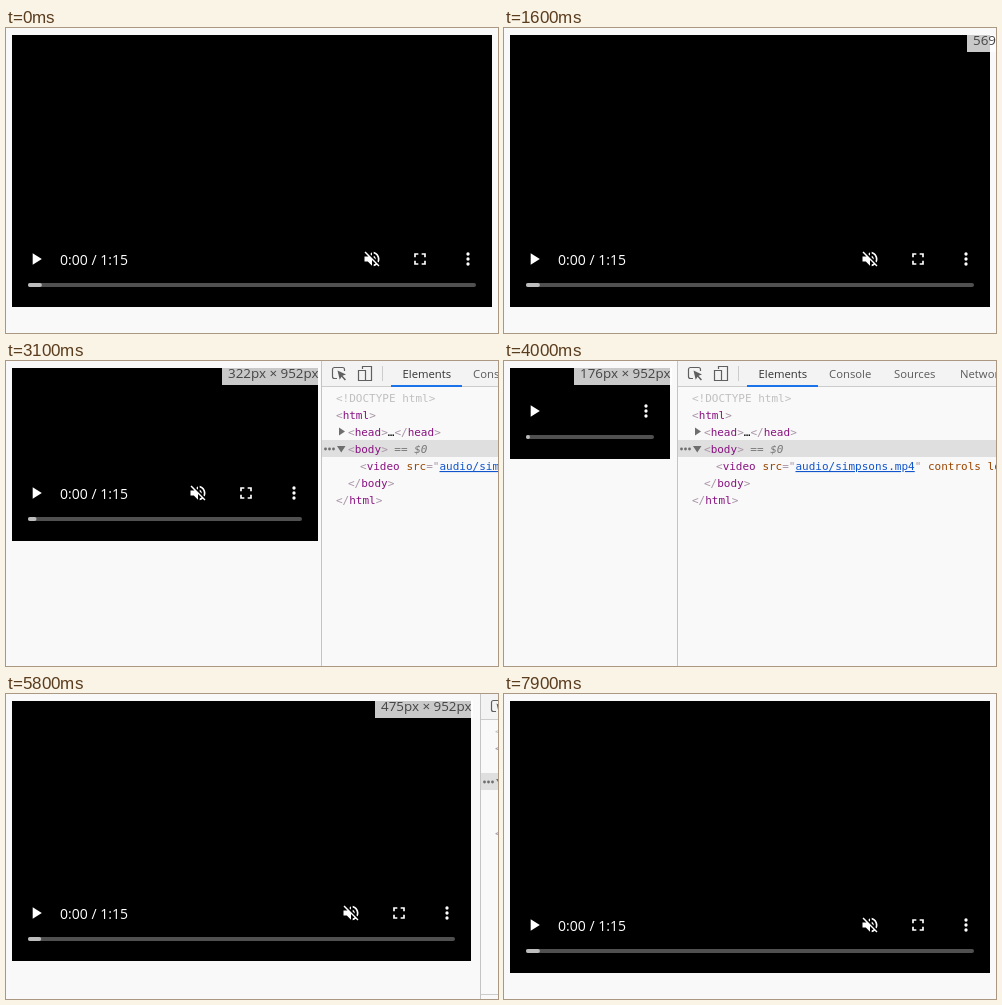
Animation of 492 by 305 pixels, one loop 8300 ms. Source, as an HTML page:

```html
<!DOCTYPE html>
<html lang="en">
<head>
<meta charset="utf-8">
<title>Resizing a video player</title>
<style>
  html, body { margin: 0; width: 100%; height: 100%; overflow: hidden; background: #f9f9f9; }
  svg { display: block; width: 100%; height: 100%; }
  text { white-space: pre; }
  .ui { font-family: "Open Sans", "Noto Sans", sans-serif; }
  .code { font: 11px "DejaVu Sans Mono", "Noto Sans Mono", monospace; }
  .tab { font-size: 11.3px; fill: #5a5a5a; }
  .p { fill: #a894a6; }
  .t { fill: #881280; }
  .a { fill: #994500; }
  .v { fill: #1a1aa6; }
  .link { fill: #1155cc; text-decoration: underline; }
  .dim { fill: #777; font-style: italic; }
  .doc { fill: #c0c0c0; }
</style>
</head>
<body>
<svg viewBox="0 0 492 305">
  <rect width="492" height="305" fill="#f9f9f9"/>

  <rect id="video" x="6" y="7"/>
  <g id="controls" fill="#fff">
    <path id="play" d="M8 5v14l11-7z"/>
    <text id="time" class="ui" x="54" y="5.5" font-size="14"><tspan>0:00</tspan><tspan id="duration"> / 1:15</tspan></text>
    <path id="mute" d="M16.5 12c0-1.77-1.02-3.29-2.5-4.03v2.21l2.45 2.45c.03-.2.05-.41.05-.63zm2.5 0c0 .94-.2 1.82-.54 2.64l1.51 1.51C20.63 14.91 21 13.5 21 12c0-4.28-2.99-7.86-7-8.77v2.06c2.89.86 5 3.54 5 6.71zM4.27 3L3 4.27 7.73 9H3v6h4l5 5v-6.73l4.25 4.25c-.67.52-1.42.93-2.25 1.18v2.06c1.38-.31 2.63-.95 3.69-1.81L19.73 21 21 19.73l-9-9L4.27 3zM12 4L9.91 6.09 12 8.18V4z"/>
    <path id="full" d="M5 10V5h5v2H7v3zM14 5h5v5h-2V7h-3zM5 14h2v3h3v2H5zM17 14h2v5h-5v-2h3z"/>
    <g id="menu"><circle cx="12" cy="6" r="2"/><circle cx="12" cy="12" r="2"/><circle cx="12" cy="18" r="2"/></g>
    <rect id="track" x="22" y="24" height="4" rx="2" fill="#505050"/>
    <rect id="buffer" x="22" y="24" height="4" rx="2" fill="#bdbdbd"/>
  </g>

  <g id="label">
    <rect y="7" width="98" height="17" fill="#fff" fill-opacity=".79"/>
    <text id="size" class="ui" x="6" y="17" font-size="13.4" fill="#444"></text>
  </g>

  <g id="panel">
    <rect width="500" height="305" fill="#f9f9f9"/>
    <rect width="500" height="25" fill="#f3f3f3"/>
    <rect y="25" width="500" height="1" fill="#ccc"/>
    <g fill="none" stroke="#5f5f5f" stroke-width="1.2">
      <path d="M16 17.5H13.5a2 2 0 0 1-2-2V8.5a2 2 0 0 1 2-2H21.500a2 2 0 0 1 2 2V10"/>
      <path d="M41.500 8V5.500H50.500V19.500H45M37.500 9.500H44.500V19.500H37.500Z"/>
    </g>
    <path d="M16.500 9.500L25 13.500L21.500 14.700L25 18.500L23.800 19.500L20.500 15.800L18.700 18.700Z" fill="#5f5f5f"/>
    <rect x="61" y="5" width="1" height="15" fill="#ccc"/>
    <rect x="70" y="24" width="71" height="2" fill="#1a73e8"/>
    <g class="ui">
      <text class="tab" x="81.500" y="17" style="fill:#333">Elements</text>
      <text class="tab" x="152" y="17">Console</text>
      <text class="tab" x="217" y="17">Sources</text>
      <text class="tab" x="283" y="17">Network</text>
    </g>
    <rect y="79" width="500" height="17" fill="#dfdfdf"/>
    <g fill="#6e6e6e">
      <circle cx="4.500" cy="88" r="1.400"/><circle cx="8.500" cy="88" r="1.400"/><circle cx="12.500" cy="88" r="1.400"/>
      <path d="M18 66.500L24 70.500L18 74.500ZM16 85H24.500L20.250 91.500Z"/>
    </g>
    <g id="tree" class="code"></g>
    <rect id="split" y="300" width="500" height="1" fill="#ccc"/>
    <rect width="1" height="305" fill="#c4c4c4"/>
  </g>
</svg>
<script>
const LOOP = 8300, STEP = 100;
const $ = id => document.getElementById(id);

const span = (cls, text) => `<tspan class="${cls}">${text}</tspan>`;
const tag = (name, slash = '') =>
  span('p', '&lt;' + slash) + span('t', name) + span('p', '&gt;');

const rows = [
  [15, span('doc', '&lt;!DOCTYPE html&gt;')],
  [15, tag('html')],
  [27, tag('head') + '…' + tag('head', '/')],
  [27, tag('body') + span('dim', ' == $0')],
  [39, span('p', '&lt;') + span('t', 'video ') + span('a', 'src') + span('p', '="') +
       span('link', 'audio/simpsons.mp4') + span('p', '" ') +
       span('a', 'controls loop') + span('p', '&gt;') + tag('video', '/')],
  [27, tag('body', '/')],
  [15, tag('html', '/')]
];
$('tree').innerHTML = rows
  .map(([x, html], i) => `<text x="${x}" y="${41 + 17 * i}">${html}</text>`).join('');

const linear = k => k;
const smooth = k => k * k * (3 - 2 * k);

// Each key: time, page width, panel edge, easing towards the next key
const keys = [
  [1600, 569, 560, linear],
  [3100, 322, 315, smooth],
  [4000, 176, 173, linear],
  [4300, 166, 163, linear],
  [5000, 166, 163, linear],
  [5100, 166, 173, smooth],
  [5800, 475, 474, linear],
  [5900, 483, 483, linear],
  [6000, 488, 487, () => 0],
  [6500, 490, 488, () => 0],
  [6900, 493, 490, linear],
  [7000, 497, 495, linear]
];

function pose(t) {
  if (t < keys[0][0]) return [600, 597];
  const i = keys.findLastIndex(k => k[0] <= t);
  const a = keys[i], b = keys[i + 1] || a;
  const k = a === b ? 0 : a[3]((t - a[0]) / (b[0] - a[0]));
  return [1, 2].map(n => Math.round(a[n] + (b[n] - a[n]) * k));
}

const show = (id, on) => $(id).setAttribute('visibility', on ? 'visible' : 'hidden');
const move = (id, x, y = 0) => $(id).setAttribute('transform', `translate(${x} ${y})`);
const icon = (id, x) =>
  $(id).setAttribute('transform', `translate(${x - 10} -10) scale(${20 / 24})`);

function draw(time) {
  const t = Math.floor(time % LOOP / STEP) * STEP;
  const [page, edge] = pose(t);

  const w = Math.min(480, page - 16), h = Math.round(w * 17 / 30), right = 6 + w;
  $('video').setAttribute('width', w);
  $('video').setAttribute('height', h);
  move('controls', 0, 7 + h - 48);
  icon('play', 30);
  icon('mute', right - 120);
  icon('full', right - 72);
  icon('menu', right - 24);
  $('track').setAttribute('width', w - 32);
  $('buffer').setAttribute('width', (w - 32) * 0.031);
  show('full', w >= 176);
  show('mute', w >= 224);
  show('time', w >= 240);
  show('duration', w >= 276);

  move('label', page - 106);
  show('label', t >= 1600 && t < 7900);
  $('size').textContent = `${page}px × 952px`;

  move('panel', edge);
  show('split', edge > 400);
}

function tick(now) {
  draw(now);
  requestAnimationFrame(tick);
}
draw(0);
requestAnimationFrame(tick);
</script>
</body>
</html>
```
